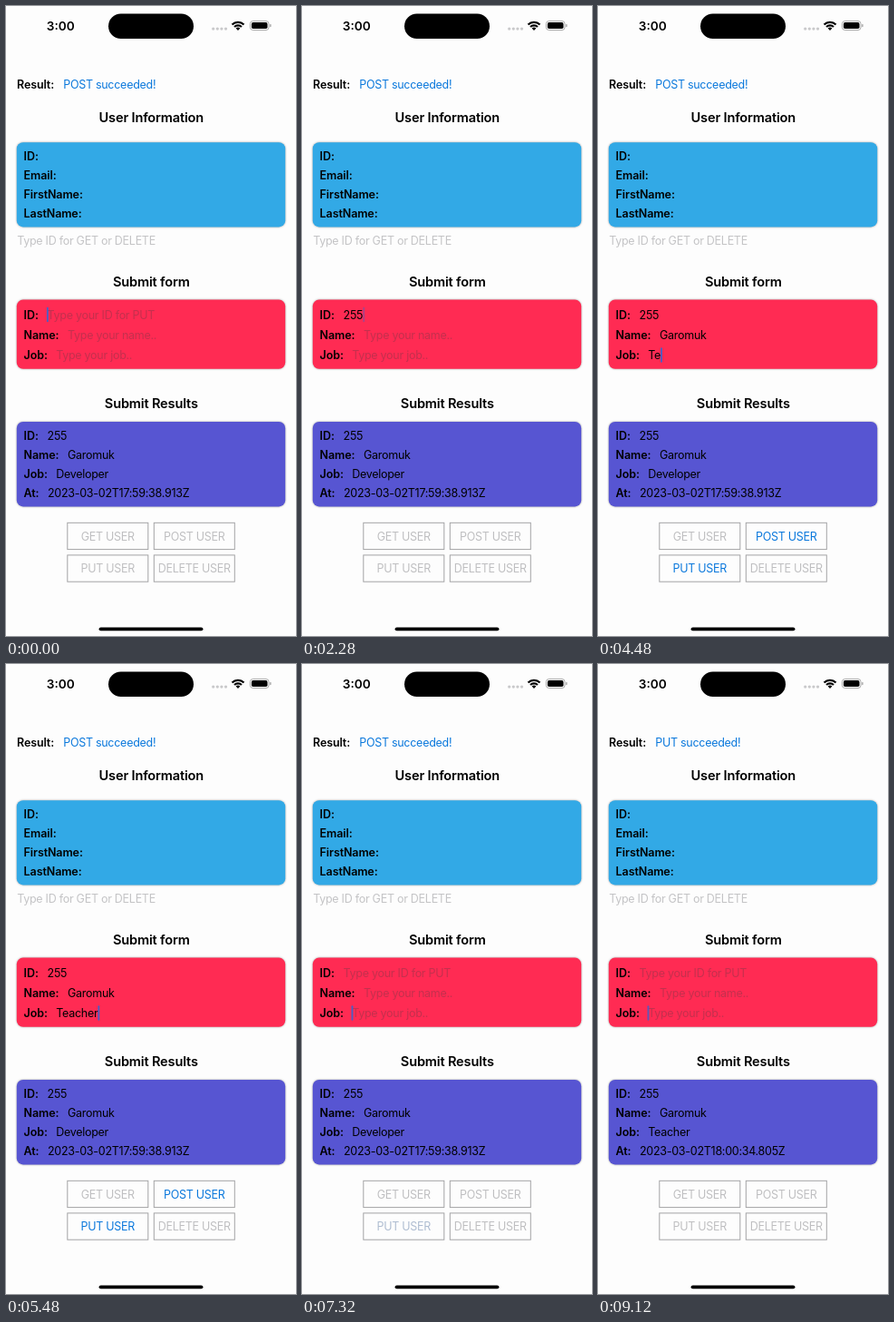
Write an HTML page that moves like this. It is 320 px wide and 694 px high and loops after 9160 ms.

```html
<!DOCTYPE html>
<html lang="en">
<head>
<meta charset="utf-8">
<title>User request form</title>
<style>
html, body { margin: 0; width: 100%; height: 100%; overflow: hidden; background: #fdfdfd; }
svg { display: block; width: 320px; height: 694px; }
text { font: 400 12.5px Inter, "Open Sans", sans-serif; letter-spacing: -.27px; fill: #000; white-space: pre; }
.label { font-weight: 600; letter-spacing: -.1px; }
.title { font-size: 14.6px; font-weight: 600; letter-spacing: -.17px; text-anchor: middle; }
.button { text-anchor: middle; }
.clock { font-size: 13.6px; font-weight: 600; letter-spacing: 0; text-anchor: middle; }
.hint { fill: #c4c4c6; }
.dim { fill: #3c3c43; fill-opacity: .3; }
.card { filter: drop-shadow(0 0 1.3px rgba(0, 0, 0, .36)); }
</style>
</head>
<body>
<svg id="stage" viewBox="0 0 320 694"></svg>
<script>
const LOOP = 9160;
const BLUE = '#0a78dc', GREY = '#bfbfc1';
const SUBMIT = 7160, REPLY = 7520;
const stage = document.getElementById('stage');

function add(tag, attrs) {
  const el = document.createElementNS('http://www.w3.org/2000/svg', tag);
  for (const key in attrs) el.setAttribute(key, attrs[key]);
  stage.append(el);
  return el;
}

function box(x, y, width, height, rx, fill, more) {
  return add('rect', { x, y, width, height, rx, fill, ...more });
}

// y is the middle of the capital letters
function text(x, y, content, cls = '') {
  const el = add('text', { x, y: y + 4.5, class: cls });
  el.textContent = content;
  return el;
}

function drawStatusBar() {
  text(60.3, 22.4, '3:00', 'clock');
  box(113, 8.5, 94, 27.5, 13.75, '#000');
  for (let i = 0; i < 4; i++) add('circle', { cx: 228.7 + i * 4.6, cy: 25.1, r: 1.65, fill: '#c9c9cb' });
  for (const r of [9.2, 5.6, 1.7]) {
    const d = r * Math.SQRT1_2;
    add('path', {
      d: `M${256 - d} ${27 - d}A${r} ${r} 0 0 1 ${256 + d} ${27 - d}`,
      fill: 'none', stroke: '#000', 'stroke-width': r < 2 ? 3.4 : 2.2
    });
  }
  box(269.4, 16.6, 20.6, 9.9, 3, 'none', { stroke: '#a0a0a0', 'stroke-width': .9 });
  box(270.9, 18.1, 17.6, 6.9, 1.8, '#000');
  box(291.2, 19.9, 1.3, 3.4, .7, '#a0a0a0');
  box(102.6, 684.4, 114.8, 3.8, 1.9, '#000');
}

function card(y, height, fill) {
  box(11.8, y, 296.4, height, 7, fill, { class: 'card' });
}

function button(x, y, label) {
  box(x, y, 89, 29.3, 0, 'none', { stroke: '#a3a3a5' });
  return text(x + 44.5, y + 15, label, 'button');
}

drawStatusBar();
text(12, 86, 'Result:', 'label');
const result = text(63.2, 86, '');
result.style.fill = BLUE;

text(160.3, 123.8, 'User Information', 'title');
card(150.2, 93.2, '#32a9e6');
['ID:', 'Email:', 'FirstName:', 'LastName:'].forEach((s, i) => text(19.6, 165.6 + i * 21.1, s, 'label'));
text(12.2, 258, 'Type ID for GET or DELETE', 'hint');

text(160.3, 304.8, 'Submit form', 'title');
card(323.6, 76.2, '#ff2b53');
const fields = [
  { label: 'ID:', x: 45.6, y: 340, hint: 'Type your ID for PUT', value: '255', keys: [1200, 1440, 1720], focus: 0 },
  { label: 'Name:', x: 68, y: 362.3, hint: 'Type your name..', value: 'Garomuk', keys: [2600, 2800, 2960, 3040, 3120, 3160, 3320], focus: 2440 },
  { label: 'Job:', x: 55.2, y: 384.6, hint: 'Type your job..', value: 'Teacher', keys: [4320, 4480, 4640, 5120, 5240, 5360, 5480], focus: 3560 }
];
for (const f of fields) {
  text(19.6, f.y, f.label, 'label');
  f.node = text(f.x, f.y, '');
}
const caret = box(0, 0, 1.9, 16.4, .9, '#2f66d6');

text(160.3, 438.8, 'Submit Results', 'title');
card(458, 93.4, '#5755d2');
const [, , job, stamp] = [
  ['ID:', 45.6, '255'], ['Name:', 68, fields[1].value], ['Job:', 55.2, ''], ['At:', 46, '']
].map(([label, x, value], i) => {
  const y = 473.1 + i * 21.1;
  text(19.6, y, label, 'label');
  return text(x, y, value);
});

button(67.8, 569.3, 'GET USER').style.fill = GREY;
const post = button(163.3, 569.3, 'POST USER');
const put = button(67.8, 604.9, 'PUT USER');
button(163.3, 604.9, 'DELETE USER').style.fill = GREY;

const resets = [40, SUBMIT, ...fields.flatMap(f => [f.focus, ...f.keys])];
const clamp = v => Math.max(0, Math.min(1, v));
const mix = (a, b, p) => `rgb(${a.map((v, i) => Math.round(v + (b[i] - v) * clamp(p)))})`;

// The caret fades out and in once a second, counted from the latest input
function blink(t) {
  const s = (t - Math.max(0, ...resets.filter(r => r <= t))) % 1000;
  return s < 740 ? clamp(1 - (s - 450) / 210) : clamp((s - 810) / 170);
}

function putColor(t) {
  const blue = [10, 120, 220], pressed = [160, 188, 224], grey = [191, 191, 193];
  if (t < 4320) return GREY;
  if (t < SUBMIT) return mix(blue, pressed, (t - 6910) / 120);
  return mix(pressed, grey, (t - SUBMIT) / 340);
}

function render(t) {
  let active = fields[0];
  for (const f of fields) {
    const count = t < SUBMIT ? f.keys.filter(k => k <= t).length : 0;
    f.node.textContent = count ? f.value.slice(0, count) : f.hint;
    f.node.setAttribute('class', count ? '' : 'dim');
    f.count = count;
    if (t >= f.focus) active = f;
  }
  const end = active.count ? active.node.getComputedTextLength() : -.7;
  caret.setAttribute('x', active.x + end);
  caret.setAttribute('y', active.y - 8.3);
  caret.setAttribute('opacity', blink(t) * .85);

  const done = t >= REPLY;
  result.textContent = done ? 'PUT succeeded!' : 'POST succeeded!';
  job.textContent = done ? 'Teacher' : 'Developer';
  stamp.textContent = done ? '2023-03-02T18:00:34.805Z' : '2023-03-02T17:59:38.913Z';
  post.style.fill = t >= 4320 && t < SUBMIT ? BLUE : GREY;
  put.style.fill = putColor(t);
}

const start = performance.now();
function tick() {
  render((performance.now() - start) % LOOP);
  requestAnimationFrame(tick);
}
render(0);
requestAnimationFrame(tick);
</script>
</body>
</html>
```
